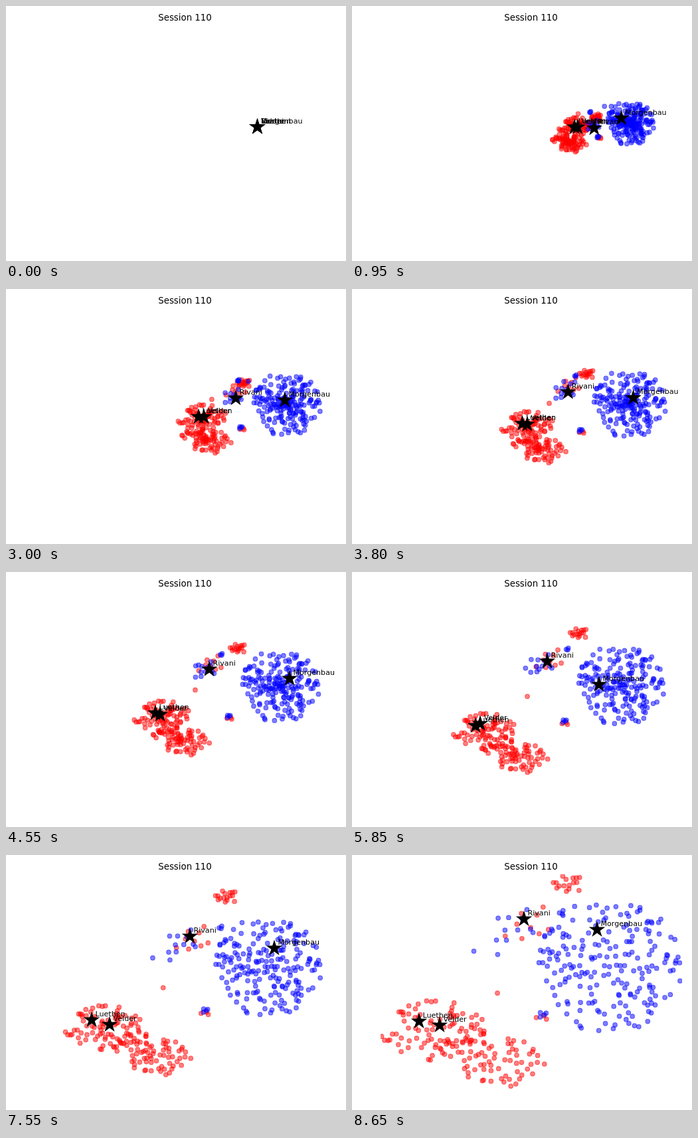
These frames come from a looping animation (512x384 px, 8.7 s). An HTML page with a canvas:

```html
<!DOCTYPE html>
<html>
<head>
<meta charset="utf-8">
<style>
html, body { margin: 0; width: 100%; height: 100%; overflow: hidden; background: #fff; }
canvas { display: block; }
</style>
</head>
<body>
<canvas id="stage" width="512" height="384"></canvas>
<script>
const ctx = document.getElementById('stage').getContext('2d');
const LOOP = 8700, STEP = 50, BURST = 1750, END = LOOP - STEP;
const ORIGIN = [378.5, 181.5];
const RED = '#f00', BLUE = '#00f';

let seed = 110;
const rand = () => (seed = seed * 16807 % 2147483647) / 2147483647;
const mix = (a, b, u) => a + (b - a) * u;
const mixPoint = (p, q, u) => p.map((v, i) => mix(v, q[i], u));

// Star waypoints after the burst, at these times.
const TIMES = [BURST, 3000, 4550, 5850, 7550, END];
const stars = [
  {name: 'Luethen', way: [[323, 182], [290, 192], [225, 212], [186, 231], [129, 248], [101, 250]]},
  {name: 'Rivani', way: [[361, 184], [346, 164], [306, 146], [294, 134], [277, 122], [259, 96]]},
  {name: 'Morgenbau', way: [[413, 165], [420, 167], [427, 160], [372, 169], [404, 140], [369, 112]]},
  {name: 'Velder', way: [[329, 182], [298, 192], [232, 214], [193, 228], [156, 255], [132, 256]]}
];
const [leader, speaker] = stars;

function starAt(star, t) {
  let k = 0;
  while (k < TIMES.length - 2 && t >= TIMES[k + 1]) k++;
  return mixPoint(star.way[k], star.way[k + 1], (t - TIMES[k]) / (TIMES[k + 1] - TIMES[k]));
}

// A cluster drifts from one point to another, relative to its star if it has one.
function cluster(color, count, [rx, ry], from, to, star, tilt = 0) {
  const dots = Array.from({length: count}, (_, i) => ({
    dist: (i + rand()) / count,
    angle: i * 2.39996 + rand() * 1.5
  }));
  return {color, rx, ry, from, to, star, tilt, dots};
}

const clusters = [
  cluster(RED, 80, [80, 46], [2, 0], [20, 13], leader),
  cluster(RED, 80, [80, 42], [-10, 30], [110, 54], leader, .2),
  cluster(RED, 1, [0, 0], [330, 157], [219, 208]),
  cluster(RED, 16, [24, 15], [366, 164], [326, 44]),
  cluster(RED, 9, [40, 32], [-2, -16], [4, 10], speaker, -.3),
  cluster(RED, 3, [14, 4], [372, 204], [287, 246]),
  cluster(BLUE, 200, [110, 102], [430, 175], [387, 167]),
  cluster(BLUE, 10, [36, 32], [-2, -4], [-14, 14], speaker, -.3),
  cluster(BLUE, 3, [4, 5], [-8, -30], [56, -9], speaker),
  cluster(BLUE, 2, [28, 34], [30, -45], [-50, 40], speaker),
  cluster(BLUE, 4, [7, 7], [368, 201], [287, 239])
];

function drawCluster(c, t, burst) {
  const g = (t - BURST) / (END - BURST);
  const scale = burst * (.42 + .3 * g + .28 * g ** 8);
  const power = mix(.9, .53, g); // packed core evens out
  let centre = mixPoint(c.from, c.to, g);
  if (c.star) centre = starAt(c.star, t).map((v, i) => v + centre[i]);
  const [cx, cy] = mixPoint(ORIGIN, centre, burst);
  ctx.fillStyle = ctx.strokeStyle = c.color;
  for (const d of c.dots) {
    const r = d.dist ** power * scale;
    const dx = Math.cos(d.angle) * r * c.rx;
    const dy = Math.sin(d.angle) * r * c.ry + dx * c.tilt;
    ctx.beginPath();
    ctx.arc(cx + dx, cy + dy, 3.33, 0, 7);
    ctx.fill();
    ctx.stroke();
  }
}

function drawStar(x, y) {
  ctx.beginPath();
  for (let i = 0; i < 10; i++) {
    const r = i % 2 ? 4.24 : 11.1, a = i * Math.PI / 5;
    ctx.lineTo(x + r * Math.sin(a), y - r * Math.cos(a));
  }
  ctx.closePath();
  ctx.fill();
  ctx.stroke();
}

function text(s, x, y, size, align) {
  ctx.font = size + 'px "DejaVu Sans", sans-serif';
  ctx.textAlign = align;
  ctx.fillText(s, x, y);
}

function draw(time) {
  const t = Math.max(time, BURST);
  const burst = Math.min(1, time / BURST) ** .4;
  ctx.fillStyle = '#fff';
  ctx.fillRect(0, 0, 512, 384);
  ctx.lineWidth = 1.1;

  ctx.save();
  ctx.beginPath();
  ctx.rect(43, 29, 454, 326);
  ctx.clip();
  ctx.globalAlpha = .5;
  for (const c of clusters) drawCluster(c, t, burst);
  ctx.restore();

  ctx.fillStyle = ctx.strokeStyle = '#000';
  for (const star of stars) {
    const [x, y] = mixPoint(ORIGIN, starAt(star, t), burst);
    drawStar(x, y + .5);
    text(star.name, x + 5.5, y - 5, 11.1, 'left');
  }
  text('Session 110', 269.5, 22, 13.33, 'center');
}

const begin = performance.now();
function tick() {
  const t = (performance.now() - begin) % LOOP;
  draw(Math.floor(t / STEP) * STEP);
  requestAnimationFrame(tick);
}
tick();
</script>
</body>
</html>
```
